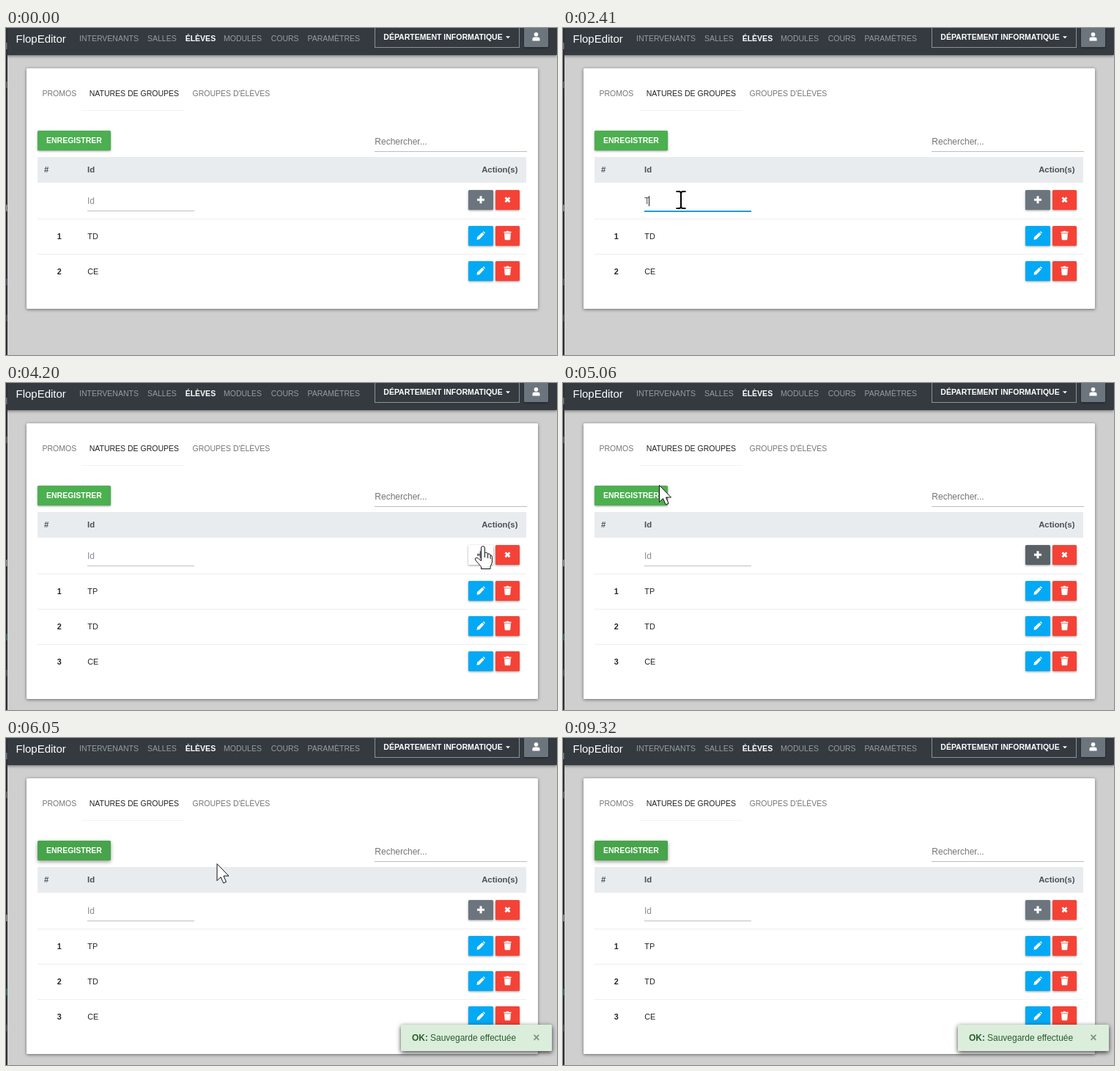
Write an HTML page with a canvas that moves like this. It is 752 px wide and 446 px high and loops after 9.41 s.

```html
<!DOCTYPE html>
<html lang="fr">
<head>
<meta charset="utf-8">
<title>FlopEditor</title>
<style>
html, body { margin: 0; overflow: hidden; background: #cfcfcf; }
canvas { display: block; }
</style>
</head>
<body>
<canvas id="stage" width="752" height="446"></canvas>
<script>
const ctx = document.getElementById('stage').getContext('2d');
const LOOP = 9410;
const CLICK_ADD = 4110, CLICK_SAVE = 5210;

// Pointer moves: start time, x, y, end time, x, y, shape. It rests after each move.
const moves = [
  [300, 536, 432, 560, 235, 273, 'arrow'],
  [710, 222, 255, 1020, 196, 234.5, 'beam'],
  [1210, 161, 234.5, 1210, 161, 234.5, 'beam'],
  [2960, 180, 236, 3270, 323, 232, 'arrow'],
  [3420, 360, 226, 3730, 617, 224, 'arrow'],
  [3800, 648, 222, 4180, 651, 222, 'hand'],
  [4510, 647, 222, 5060, 131, 139, 'arrow'],
  [5135, 112, 147, 5210, 105, 148, 'hand'],
  [5910, 190, 155, 6050, 286, 170, 'arrow'],
  [6050, 286, 170, 6220, 546, 359, 'arrow'],
  [6530, 570, 368, 6760, 692, 405, 'arrow'],
  [6760, 692, 405, 6910, 677, 429, 'arrow'],
  [7260, 612, 429, 7260, 612, 429, 'arrow'],
];
const POINTER_END = 7630;

const icons = {
  plus: new Path2D('M-1.5-5h3v3.5H5v3H1.5V5h-3V1.5H-5v-3h3.5z'),
  cross: new Path2D('M-4-2 -2-4 0-2 2-4 4-2 2 0 4 2 2 4 0 2 -2 4 -4 2 -2 0z'),
  pencil: new Path2D('M-5.5 5.5 -5 2 2-4.6 4.6-2 -2 5zM2.7-5.2 4-6 5.9-4 5.3-2.7z'),
  trash: new Path2D('M-5-5.5h3l.8-1h2.4l.8 1h3v1.6H-5zM-4.4-3h8.8L3.8 5Q3.7 6 2.7 6h-5.4Q-3.7 6-3.8 5z'),
  user: new Path2D('M-2.8-3.2a2.8 2.8 0 1 0 5.6 0a2.8 2.8 0 1 0-5.6 0M-5 5.5V3Q-5 .6-2.2.6h4.4Q5 .6 5 3v2.5z'),
};
const pointers = {
  arrow: new Path2D('M.5.5V23.5L5.5 18.5 9.3 26.8 13 25.2 9.5 17H16.5z'),
  hand: new Path2D('M-2.5 17V3Q-2.3.6 0 .6T2.4 3V10Q3.5 8.8 5.2 9.5Q6.4 10 6.6 11.3Q8 10.4 9.3 11.4Q10 12 10.1 13Q12.5 12.5 12.5 15.5V22Q12.3 25 10 28V31.5H-2.5V28.5L-10 20Q-11.6 17.6-9.7 16.5Q-8.2 15.8-6.5 17.3L-2.5 20.5z'),
  beam: new Path2D('M-6.5-12.5h5l1.5 1 1.5-1h5v2H2L1-9V9l1 1.5h4.5v2h-5l-1.5-1-1.5 1h-5v-2H-2L-1 9V-9l-1-1.5h-4.5z'),
};

function rect(x, y, w, h, color) {
  ctx.fillStyle = color;
  ctx.fillRect(x, y, w, h);
}

function panel(x, y, w, h, color, blur = 3, drop = 1, shade = .4) {
  ctx.save();
  ctx.shadowColor = `rgba(0,0,0,${shade})`;
  ctx.shadowBlur = blur;
  ctx.shadowOffsetY = drop;
  ctx.fillStyle = color;
  ctx.beginPath();
  ctx.roundRect(x, y, w, h, 1.5);
  ctx.fill();
  ctx.restore();
}

function text(str, x, y, size, color, bold = false, align = 'left') {
  ctx.font = `${bold ? 'bold ' : ''}${size}px "Liberation Sans", Arial, sans-serif`;
  ctx.textAlign = align;
  ctx.fillStyle = color;
  ctx.fillText(str, x, y);
}

function icon(name, x, y, color = '#fff') {
  ctx.save();
  ctx.translate(x, y);
  ctx.fillStyle = color;
  ctx.fill(icons[name]);
  ctx.restore();
}

function iconButton(name, x, y, w, color, ink) {
  panel(x, y, w, 27, color);
  icon(name, x + w / 2, y + 13.3, ink);
}

function drawNavbar() {
  panel(0, -4, 752, 41, '#343a40', 4, 1, .5);
  text('FlopEditor', 13.5, 20, 15, '#fff');
  [['INTERVENANTS', 100], ['SALLES', 193], ['ÉLÈVES', 244.7], ['MODULES', 297],
    ['COURS', 361.7], ['PARAMÈTRES', 411.5]].forEach(([label, x]) => {
    const active = label === 'ÉLÈVES';
    text(label, x, 18, 10.5, active ? '#fff' : '#999c9f', active);
  });
  ctx.strokeStyle = '#8d9296';
  ctx.lineWidth = 1;
  ctx.strokeRect(503.5, -2.5, 197, 29);
  text('DÉPARTEMENT INFORMATIQUE', 515.3, 16, 10.5, '#fff', true);
  ctx.fill(new Path2D('M682 11.3h6l-3 3z'));
  panel(707, -3, 33, 29, '#6c757d');
  icon('user', 723.5, 12);
}

function drawInput(t) {
  const focus = t >= 1360 && t < CLICK_ADD;
  const value = t < 1940 || t >= CLICK_ADD ? '' : t < 2500 ? 'T' : 'TP';
  rect(111, 249, 146, 1, '#bfbfbf');
  if (focus) {
    const half = 73 * Math.min(1, (t - 1360) / 210);
    rect(184 - half, 249, half * 2, 2, '#1f9bd7');
  }
  if (value) text(value, 111, 240, 12, '#495057');
  else text('Id', 111, 240, 12, '#868e96');
  if (focus && (value || t < 1780)) {
    rect(111 + [0, 6, 14][value.length], 229, 1, 14, '#222');
  }
  if (value === 'TP') {
    for (let x = 111; x < 126; x += 2) rect(x, 241 + x / 2 % 1, 1, 1, '#f33');
  }
}

function drawCard(t) {
  const rows = t < CLICK_ADD ? ['TD', 'CE'] : ['TP', 'TD', 'CE'];
  panel(28, 55, 698, 232 + rows.length * 48, '#fff', 4, 1, .5);

  text('PROMOS', 49.5, 93, 10.5, '#757575');
  text('NATURES DE GROUPES', 113.7, 93, 10.5, '#212121');
  text("GROUPES D'ÉLÈVES", 254.5, 93, 10.5, '#757575');
  rect(104, 112, 140, 1, '#f3f3f3');

  const saved = t >= CLICK_SAVE;
  panel(43, 140, 100, 27, saved ? '#47a44b' : '#4caf50', saved ? 5 : 3, saved ? 2 : 1);
  text('ENREGISTRER', 55, 157, 10.5, '#fff', true);
  text('Rechercher...', 503.3, 159, 12, '#757575');
  rect(503, 168, 208, 1, '#bdbdbd');

  rect(43, 176, 667, 35, '#e9ecef');
  text('#', 52, 197, 11.4, '#495057', true);
  text('Id', 111, 197, 11.4, '#495057', true);
  text('Action(s)', 698.5, 197, 11.4, '#495057', true, 'right');

  drawInput(t);
  const flash = t >= CLICK_ADD && t < 4260;
  const addColor = flash ? '#fff' : t >= 4260 && t < 5440 ? '#5a6268' : '#6c757d';
  iconButton('plus', 631, 221, 34, addColor, flash ? '#6c757d' : '#fff');
  iconButton('cross', 668, 221, 33, '#f44336');

  rows.forEach((name, i) => {
    const y = 270 + i * 48;
    rect(43, y - 10, 667, 1, '#eceeef');
    text(i + 1, 72.7, y + 18, 10.8, '#212529', true, 'center');
    text(name, 111.3, y + 18, 10.8, '#212529');
    iconButton('pencil', 631, y, 34, '#03a9f4');
    iconButton('trash', 668, y, 33, '#f44336');
  });
}

function drawToast(t) {
  if (t < 5440) return;
  ctx.save();
  ctx.globalAlpha = Math.min(1, (t - 5370) / 380);
  panel(539, 391, 206, 36, '#dbeddb', 6, 2, .75);
  text('OK:', 554, 413, 12, '#2c5c2e', true);
  text('Sauvegarde effectuée', 579, 413, 12, '#2c5c2e');
  text('×', 724, 414, 16, '#809481', true, 'center');
  ctx.restore();
}

function drawPointer(t) {
  const move = moves.findLast(m => t >= m[0]);
  if (!move || t >= POINTER_END) return;
  const [t0, x0, y0, t1, x1, y1, shape] = move;
  const p = t1 > t0 ? Math.min(1, (t - t0) / (t1 - t0)) : 1;
  ctx.save();
  ctx.translate(x0 + (x1 - x0) * p, y0 + (y1 - y0) * p);
  const beam = shape === 'beam';
  ctx.fillStyle = beam ? '#000' : '#fff';
  ctx.fill(pointers[shape]);
  if (!beam) {
    ctx.strokeStyle = '#111';
    ctx.lineWidth = 1;
    ctx.stroke(pointers[shape]);
    if (shape === 'hand') ctx.stroke(new Path2D('M2.4 9.5V16M6.6 11V17M10.1 13V18'));
  }
  ctx.restore();
}

function draw(now) {
  const t = now % LOOP;
  rect(0, 0, 752, 446, '#cfcfcf');
  drawNavbar();
  drawCard(t);
  drawToast(t);
  rect(0, 0, 2, 446, '#2d2f33');
  [[20, '#777'], [73, '#666'], [241, '#999'], [342, t < 3420 ? '#5b5575' : '#2f7565'], [391, '#555']]
    .forEach(([y, color]) => rect(0, y, 1.5, 9, color));
  drawPointer(t);
  requestAnimationFrame(draw);
}
requestAnimationFrame(draw);
</script>
</body>
</html>
```
